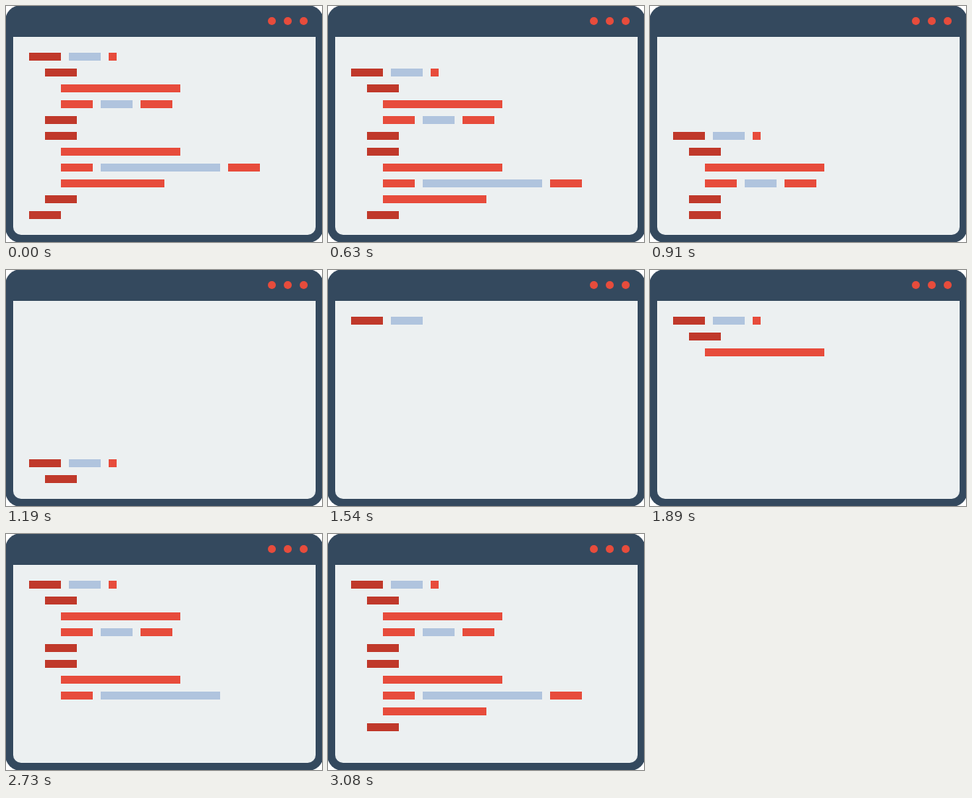
Write an HTML page with a canvas that moves like this. It is 397 px wide and 298 px high and loops after 3150 ms.

```html
<!DOCTYPE html>
<html lang="en">
<head>
<meta charset="utf-8">
<title>Code window</title>
<style>
  html, body { margin: 0; width: 100%; height: 100%; overflow: hidden; background: #fff; }
  canvas { display: block; }
</style>
</head>
<body>
<canvas id="stage" width="397" height="298"></canvas>
<script>
const ctx = document.getElementById('stage').getContext('2d');
const STEP = 70, STEPS = 45, ROW = 20, TYPED = 51;
const NAVY = '#34495e', PAPER = '#ecf0f1', RED = '#e74c3c', DARK = '#c0392b', BLUE = '#b0c4de';

// Each line of code is a list of bars: [x, width, colour]
const tag = x => [[x, 40, DARK]];
const lines = [
  [[29, 40, DARK], [79, 40, BLUE], [129, 10, RED]],
  tag(49),
  [[69, 150, RED]],
  [[69, 40, RED], [119, 40, BLUE], [169, 40, RED]],
  tag(49),
  tag(49),
  [[69, 150, RED]],
  [[69, 40, RED], [119, 150, BLUE], [279, 40, RED]],
  [[69, 130, RED]],
  tag(49),
  tag(29)
];

function panel(x, y, w, h, radii, color) {
  ctx.fillStyle = color;
  ctx.beginPath();
  ctx.roundRect(x, y, w, h, radii);
  ctx.fill();
}

function drawWindow() {
  ctx.clearRect(0, 0, 397, 298);
  panel(-1, -1, 400, 300, 20, NAVY);
  panel(9, 39, 380, 250, [0, 0, 10, 10], PAPER);
  for (const x of [329, 349, 369]) panel(x, 14, 10, 10, 5, RED);
}

// Draws the code moved down by `shift` rows, after `typed` typing steps
function drawCode(shift, typed) {
  lines.forEach((bars, row) => {
    const y = 59 + (row + shift) * ROW;
    for (const [x, w, color] of bars) {
      const shown = Math.min(w, Math.max(0, typed) * TYPED);
      typed -= Math.ceil(w / TYPED);
      if (y > 260) continue;
      ctx.fillStyle = color;
      ctx.fillRect(x, y, shown, 10);
    }
  });
}

function frame() {
  const step = Math.floor(performance.now() / STEP) % STEPS;
  drawWindow();
  if (step < 20) drawCode(Math.max(0, step - 8), Infinity);
  else drawCode(0, step - 20);
  requestAnimationFrame(frame);
}
frame();
</script>
</body>
</html>
```
